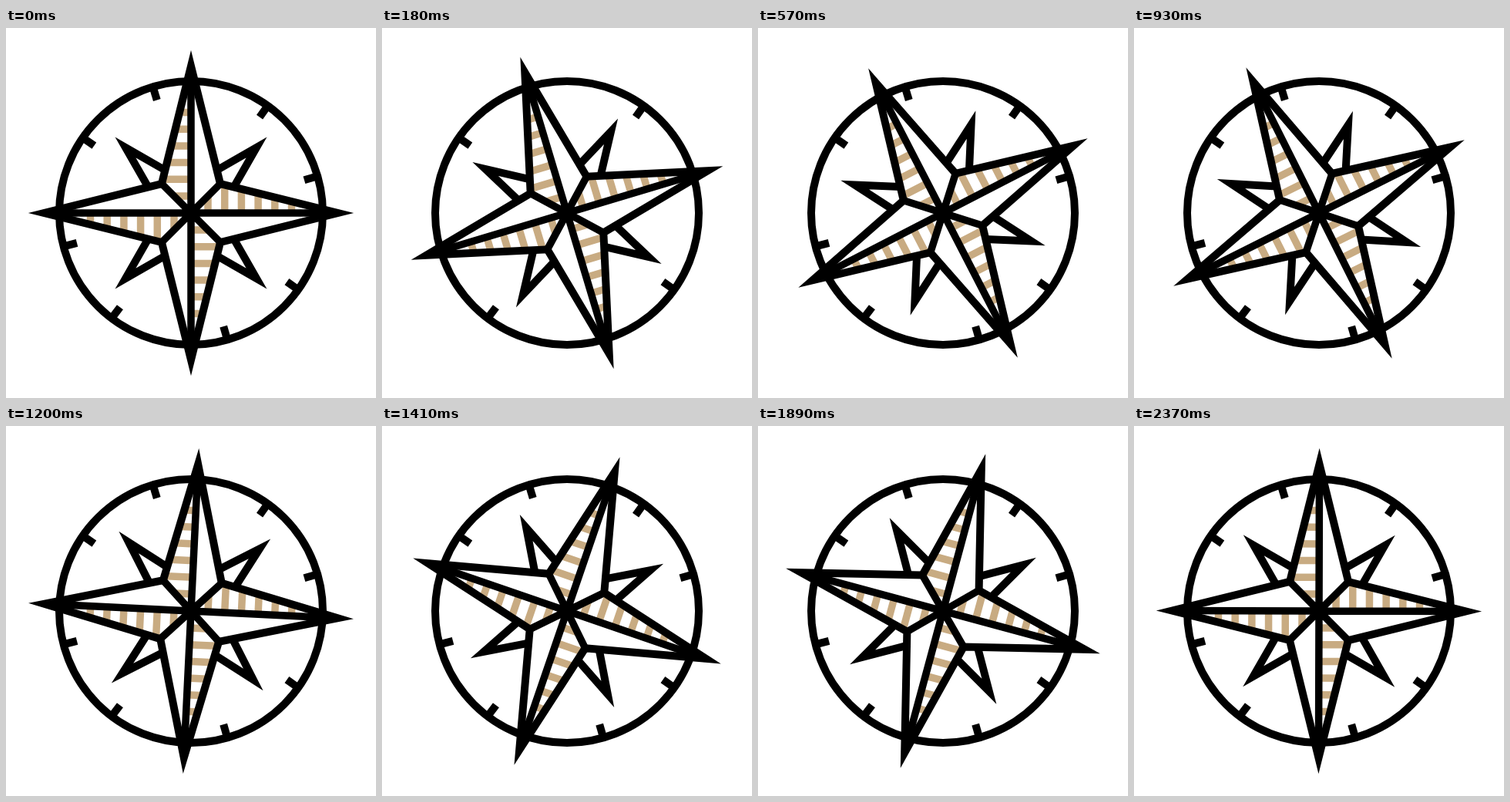
Animation, 480 px wide and 480 px high, one loop 2400 ms. Source, as an HTML page:

```html
<!DOCTYPE html>
<html lang="en">
<head>
<meta charset="utf-8">
<title>Compass</title>
<style>
  html, body { margin: 0; width: 100%; height: 100%; overflow: hidden; background: #fff; }
  svg { display: block; width: 100vw; height: 100vh; }
</style>
</head>
<body>
<svg viewBox="-240 -240 480 480" fill="none" stroke="#000" stroke-width="10" stroke-miterlimit="8">
  <defs>
    <clipPath id="half"><path d="M0 0L-38 -38L0 -190.5Z"/></clipPath>
    <path id="spike" d="M-33.5 -55.5L-85 -85L-55.5 -33.5"/>
    <path id="tick" d="M0 -153V-171"/>
    <path id="stripes" clip-path="url(#half)" stroke="#c8ab82" stroke-width="9.5"
      d="M-40 -22H0M-40 -43.7H0M-40 -65.4H0M-40 -87.1H0M-40 -108.8H0M-40 -130.5H0"/>
  </defs>
  <circle r="171"/>
  <g id="dial"></g>
  <g id="rose">
    <g id="spikes"></g>
    <path fill="#fff" stroke="none" d="M0 -190.5L38 -38L190.5 0L38 38L0 190.5L-38 38L-190.5 0L-38 -38Z"/>
    <g id="shade"></g>
    <path d="M0 -190.5L38 -38L190.5 0L38 38L0 190.5L-38 38L-190.5 0L-38 -38Z"/>
    <path stroke-width="9.5" d="M0 -190V190M-190 0H190M-38 -38L38 38M38 -38L-38 38"/>
  </g>
</svg>
<script>
  const LOOP = 2400, STEP = 30;
  const $ = id => document.getElementById(id);

  // Repeats a shape around the centre at the given angles.
  const ring = (group, shape, angles) => {
    $(group).innerHTML = angles.map(a => `<use href="#${shape}" transform="rotate(${a})"/>`).join('');
  };
  const quarters = [0, 90, 180, 270];
  ring('dial', 'tick', [-16.8, 35.6, 73.8, 125.6, 164, 217, 255.3, 304.8]);
  ring('spikes', 'spike', quarters);
  ring('shade', 'stripes', quarters);

  // [time in ms, angle in degrees]
  const keys = [[0, 0], [350, -32], [600, -27.1], [900, -27.1],
                [1400, 19], [1650, 4.6], [1900, 15.2], [LOOP, 0]];
  const ease = u => u * u * (3 - 2 * u);

  function angleAt(t) {
    const i = keys.findIndex(key => key[0] > t);
    const [t0, a0] = keys[i - 1], [t1, a1] = keys[i];
    return a0 + (a1 - a0) * ease((t - t0) / (t1 - t0));
  }

  function draw() {
    const t = Math.floor(performance.now() % LOOP / STEP) * STEP;
    $('rose').setAttribute('transform', `rotate(${angleAt(t)})`);
    requestAnimationFrame(draw);
  }
  draw();
</script>
</body>
</html>
```
